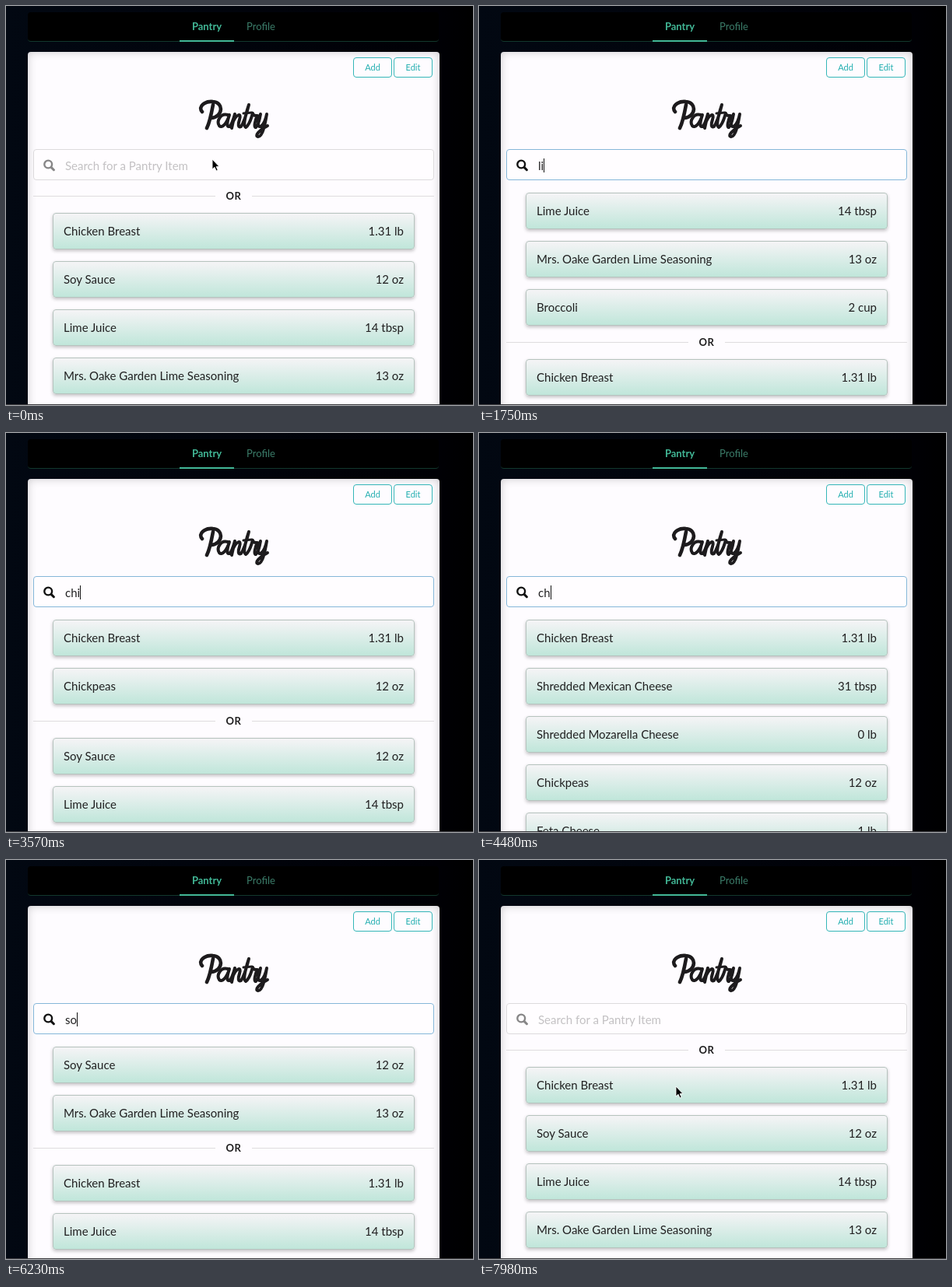
Write an HTML page that moves like this. It is 600 by 513 pixels and loops after 8 s.

```html
<!DOCTYPE html>
<html lang="en">
<head>
<meta charset="utf-8">
<title>Pantry search</title>
<style>
  * { box-sizing: border-box; }
  html, body { margin: 0; width: 100%; height: 100%; overflow: hidden; background: #000; }
  #stage {
    position: relative; width: 600px; height: 513px; overflow: hidden;
    background: linear-gradient(90deg, #020812, #01040c 45%, #000005 92%, #000);
    font: 15px/20px Lato, sans-serif; color: #212021;
  }
  #stage div, #stage svg, .tab { position: absolute; white-space: pre; }
  #nav {
    left: 28px; top: 8px; width: 528px; height: 38px; background: #000;
    border-bottom: 1px solid #12382d; border-radius: 4px;
  }
  .tab { top: 0; height: 38px; line-height: 37px; font-size: 13px; text-align: center; color: #3b7c69; }
  .tab.active { font-weight: 700; color: #42b897; border-bottom: 2px solid #42b897; }
  #panel {
    left: 28px; top: 59px; width: 529px; height: 480px; background: #fefcff;
    border-radius: 4px; box-shadow: inset 0 0 12px rgba(0, 0, 0, .2);
  }
  .button {
    top: 66px; height: 26px; border: 1.5px solid #35b6b8; border-radius: 4px;
    font-size: 11px; line-height: 24px; text-align: center; color: #22aeb0;
  }
  #search {
    left: 35px; top: 184px; width: 515px; height: 40px;
    background: #fffdff; border: 1px solid #dcdadc; border-radius: 4px;
  }
  #text { left: 76px; top: 195px; }
  #caret { top: 196px; width: 1px; height: 18px; background: #111; }
  #or { left: 35px; width: 515px; height: 20px; text-align: center; font-size: 13px; font-weight: 700; letter-spacing: .65px; }
  #or::before, #or::after { content: ""; position: absolute; top: 10px; width: 234px; height: 1px; background: #dedcde; }
  #or::before { left: 0; }
  #or::after { right: 0; }
  .item {
    left: 60px; width: 465px; height: 47px; padding: 0 13px; line-height: 45px;
    display: flex; justify-content: space-between;
    background: linear-gradient(#f5f4f6, #c0e6da);
    border: 1px solid #b6c3be; border-radius: 4px; box-shadow: 0 2px 4px rgba(0, 0, 0, .24);
  }
  #edge { left: 0; top: 512px; width: 600px; height: 1px; background: #3c3c40; }
</style>
</head>
<body>
<div id="stage">
  <div id="nav">
    <span class="tab active" style="left:195px;width:70px">Pantry</span>
    <span class="tab" style="left:265px;width:69px">Profile</span>
  </div>
  <div id="panel"></div>
  <div class="button" style="left:446px;width:50px">Add</div>
  <div class="button" style="left:498px;width:50px">Edit</div>

  <svg role="img" aria-label="Pantry" width="600" height="180" fill="none" stroke="#1d1b1d" stroke-width="4" stroke-linecap="round" stroke-linejoin="round">
    <path stroke-width="4.6" d="M252 136C246 129 256 122 266 123C280 124 279 142 264 144M266 127C264 138 262 149 258 157"/>
    <path d="M285 140C276 137 270 148 274 154C278 158 284 150 287 140C284 149 283 156 287 155C290 153 292 146 294 139L290 157M291 151C296 138 303 137 300 146C298 152 298 157 302 155C306 149 309 139 312 127C308 139 304 154 308 156C313 153 315 144 317 138C318 142 321 141 323 141C320 147 318 156 321 156C324 154 326 145 327 139C323 149 323 156 327 155C331 153 334 145 335 139C333 151 330 168 324 168C319 167 325 160 336 154"/>
    <path stroke-width="3" d="M305 138L316 137"/>
  </svg>

  <div id="search"></div>
  <svg id="icon" style="left:48px;top:197px" width="16" height="16" fill="none" stroke="#111" stroke-linecap="round">
    <circle cx="6.2" cy="6.5" r="4.9" stroke-width="2.4"/>
    <path stroke-width="3" d="M10.3 10.6L13.4 13.7"/>
  </svg>
  <div id="text"></div>
  <div id="caret"></div>
  <div id="list"></div>
  <div id="or">OR</div>
  <div id="edge"></div>
  <svg id="pointer" style="left:0;top:0" width="14" height="20">
    <path d="M1 1V14L4 11.3L6.1 16L8.2 15.1L6.2 10.6H10Z" fill="#000" stroke="#fff" stroke-width=".9"/>
  </svg>
</div>
<script>
const LOOP = 8000, FOCUS = 490, BLUR = 7840, HIDE = 1050, SHOW = 7700;
const pantry = [
  ["Chicken Breast", "1.31 lb"], ["Soy Sauce", "12 oz"], ["Lime Juice", "14 tbsp"],
  ["Mrs. Oake Garden Lime Seasoning", "13 oz"], ["Shredded Mexican Cheese", "31 tbsp"],
  ["Shredded Mozarella Cheese", "0 lb"], ["Chickpeas", "12 oz"], ["Feta Cheese", "1 lb"],
  ["Broccoli", "2 cup"]
];
// [time, contents of the search field]
const keys = [
  [0, ""], [1050, "l"], [1260, "li"], [2240, "l"], [2450, ""], [3010, "c"], [3220, "ch"],
  [3430, "chi"], [4060, "ch"], [4620, "c"], [4760, ""], [5880, "s"], [6020, "so"],
  [6370, "s"], [6720, ""]
];
const $ = id => document.getElementById(id);
const clamp = x => Math.max(0, Math.min(1, x));
const ease = x => x * x * (3 - 2 * x);
let shownQuery = null;

function itemHtml([name, amount], top) {
  return `<div class="item" style="top:${top}px"><span>${name}</span><span>${amount}</span></div>`;
}

function showQuery(query) {
  const matches = ([name]) => query.length > 1 && name.toLowerCase().includes(query);
  const found = pantry.filter(matches);
  const others = pantry.filter(item => !matches(item));
  const orY = found.length ? 246 + 62 * found.length : 244;
  $("list").style.cssText = "left:0;top:0";
  $("list").innerHTML =
    found.map((item, i) => itemHtml(item, 240 + 62 * i)).join("") +
    others.map((item, i) => itemHtml(item, orY + 22 + 62 * i)).join("");
  $("or").style.top = orY - 10 + "px";
  $("text").textContent = query || "Search for a Pantry Item";
  shownQuery = query;
}

function draw(t) {
  const [keyTime, query] = keys.filter(key => key[0] <= t).pop();
  if (query !== shownQuery) showQuery(query);

  const focus = clamp((t - FOCUS) / 100) - clamp((t - BLUR) / 100);
  $("search").style.borderColor = `color-mix(in srgb, #85b7d9 ${focus * 100}%, #dcdadc)`;
  $("icon").style.opacity = .5 + .5 * focus;
  $("text").style.color = query ? "#212021" : `color-mix(in srgb, #858485 ${focus * 100}%, #c3c1c3)`;

  const blinkStart = Math.max(keyTime, FOCUS);
  const caretOn = t >= FOCUS && t < BLUR && (t - blinkStart) % 1000 < 500;
  $("caret").style.visibility = caretOn ? "visible" : "hidden";
  $("caret").style.left = 76 + (query ? $("text").offsetWidth : 0) + "px";

  const move = ease(clamp((t - SHOW) / 240));
  $("pointer").style.visibility = t < HIDE || t >= SHOW ? "visible" : "hidden";
  $("pointer").style.transform = `translate(${264 - 12 * move}px, ${196 + 94 * move}px)`;
}

function frame(now) {
  draw(now % LOOP);
  requestAnimationFrame(frame);
}
draw(0);
requestAnimationFrame(frame);
</script>
</body>
</html>
```
